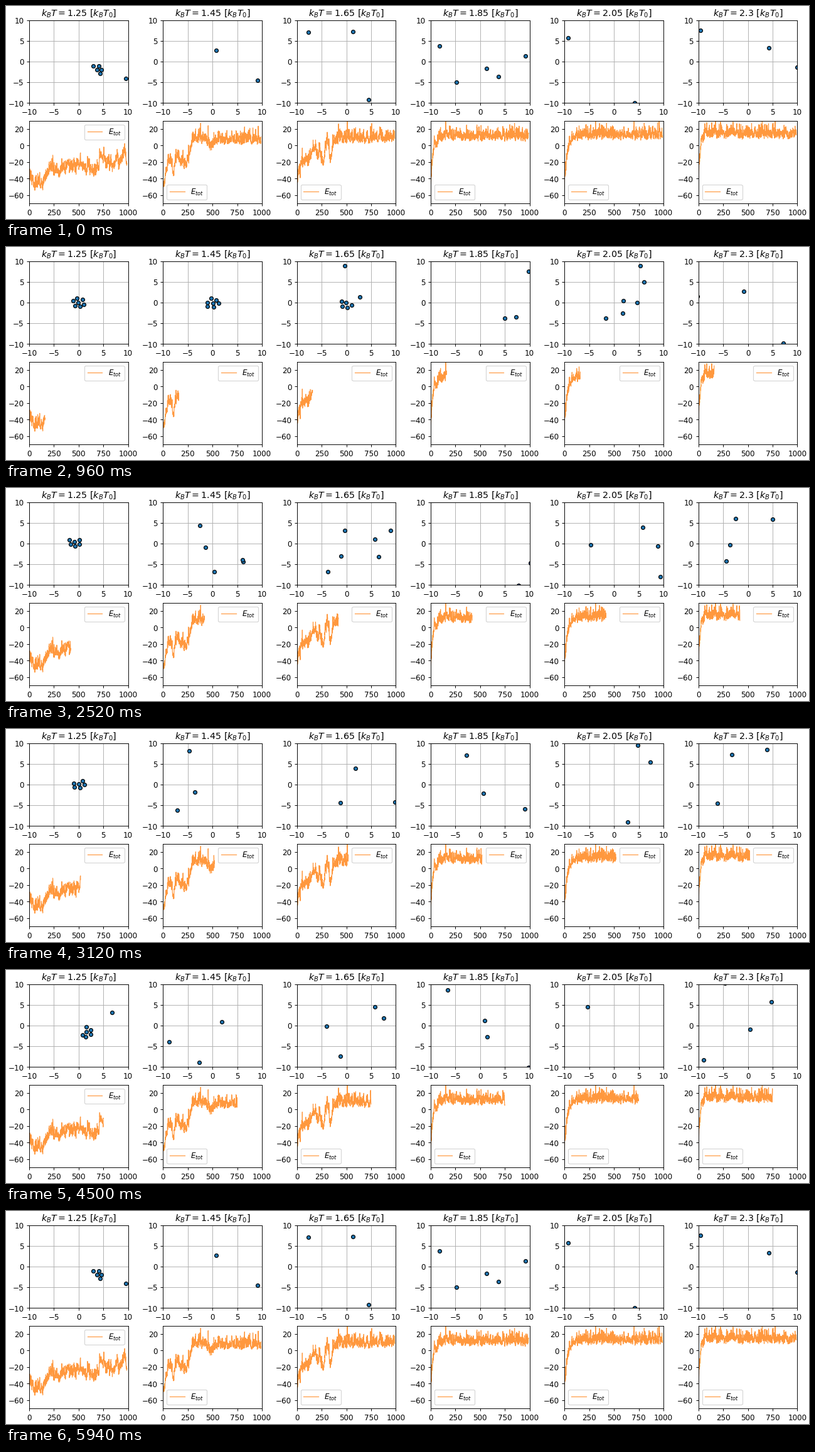
Write a matplotlib script that moves like this. It is 1280x341 px and loops after 6000 ms.

```python
import numpy as np
import matplotlib.pyplot as plt
from matplotlib.animation import FuncAnimation

FRAMES, STEPS = 100, 10          # simulation steps per frame
N = 7                            # particles per box
WALL = 15                        # the particles' box is wider than the view
FLAKE = 1.1 * np.append(np.exp(1j * np.pi / 3 * np.arange(N - 1)), 0)
TIME = np.arange(FRAMES * STEPS)


def smooth_noise(rng, size, rho):
    """Unit-variance noise that remembers a share rho of its last value."""
    out = rng.normal(size=size)
    for k in range(1, size):
        out[k] = rho * out[k - 1] + np.sqrt(1 - rho ** 2) * out[k]
    return out


def bounce(x):
    return WALL - abs((x + WALL) % (4 * WALL) - 2 * WALL)


def warm_up(temp, tau):
    top = 6.8 * temp
    return top - (45 + top) * np.exp(-TIME / tau)


def through(*points):
    return np.interp(TIME, *np.transpose(points))


def make_paths(rng, temp, first, gap, drift):
    """A hexagonal flake that loses its particles one after another."""
    n = np.arange(FRAMES)
    centre = np.interp(n, np.linspace(0, FRAMES - 1, len(drift)), drift)
    spin = np.exp(1j * (0.3 + 0.03 * n))
    paths = []
    for i, site in enumerate(FLAKE):
        shake = smooth_noise(rng, FRAMES, 0.6) + 1j * smooth_noise(rng, FRAMES, 0.6)
        bound = centre + site * spin + 0.1 * shake
        leave = int(first + gap * i)
        if leave < FRAMES:
            speed = 0.5 * np.sqrt(temp)
            v = speed * (rng.normal() + 1j * rng.normal())
            free = bound[leave] + v * (n - leave)
            free = bounce(free.real) + 1j * bounce(free.imag)
            bound = np.where(n < leave, bound, free)
        paths.append(bound)
    return np.array(paths)


def make_energy(rng, trend):
    fast = smooth_noise(rng, len(TIME), 0.5)
    slow = smooth_noise(rng, len(TIME), 0.93)
    thermal = 4 * (fast + 0.13 * (fast ** 2 - 1))
    return trend + thermal + 3.5 * slow * (trend < 0)


# temperature, frame of the first escape, frames between escapes, energy trend
BOXES = [
    (1.25, 25, 63, through((0, -38), (130, -42), (210, -25), (660, -28), (740, -10),
                           (800, -20), (910, -20), (960, -5), (990, -20))),
    (1.45, 18, 2.5, through((0, -48), (60, -15), (110, -22), (130, -10), (230, -26),
                            (300, 9), (430, 10), (470, -1), (530, 8), (990, 8.5))),
    (1.65, 8, 4, through((0, -40), (50, -22), (110, -20), (165, -2), (225, -5),
                         (265, -20), (310, 10), (340, -14), (375, 9), (990, 11.5))),
    (1.85, 1, 0.8, warm_up(1.85, 32)),
    (2.05, 3, 1.5, warm_up(2.05, 31)),
    (2.3, 2, 1, warm_up(2.3, 19)),
]
COLD_DRIFT = [0, 0, -1.7 + 0.2j, 0.6j, 0.4 - 2.3j, 2.5 - 1j, 3.6 - 2j]

fig, axes = plt.subplots(2, len(BOXES), figsize=(15, 4), dpi=1280 / 15,
                         layout="constrained")

panels = []
for (temp, first, gap, trend), top, low in zip(BOXES, *axes):
    top.set(xlim=(-10, 10), ylim=(-10, 10),
            xticks=range(-10, 11, 5), yticks=range(-10, 11, 5))
    top.set_title(rf"$k_BT={temp}\ [k_BT_0]$")
    top.grid(True)
    dots, = top.plot([], [], "o", color="C0", mec="k", ms=5, mew=1)

    low.set(xlim=(0, 1000), ylim=(-70, 30),
            xticks=range(0, 1001, 250), yticks=range(-60, 21, 20))
    line, = low.plot([], [], color="C1", lw=1, alpha=0.8, label="$E_{tot}$")
    legend = low.legend(loc="upper right")

    rng = np.random.default_rng(int(100 * temp))
    drift = COLD_DRIFT if temp < 1.3 else [0, -0.5j]
    paths = make_paths(rng, temp, first, gap, drift)
    panels.append((dots, paths, line, make_energy(rng, trend), legend))

# lay out once, then keep the axes fixed
fig.draw_without_rendering()
fig.set_layout_engine("none")


def update(frame):
    n = frame or FRAMES - 1      # the loop opens on the final state
    end = n * STEPS
    for dots, paths, line, energy, legend in panels:
        dots.set_data(paths[:, n].real, paths[:, n].imag)
        line.set_data(TIME[:end], energy[:end])
        # a high curve pushes the legend out of the right corner
        crowded = end >= 560 and energy[500:560].max() > 8
        legend.set_loc("lower left" if crowded else "upper right")


anim = FuncAnimation(fig, update, frames=FRAMES, interval=60,
                     init_func=lambda: update(0), repeat=True, repeat_delay=0)
plt.show()
```
